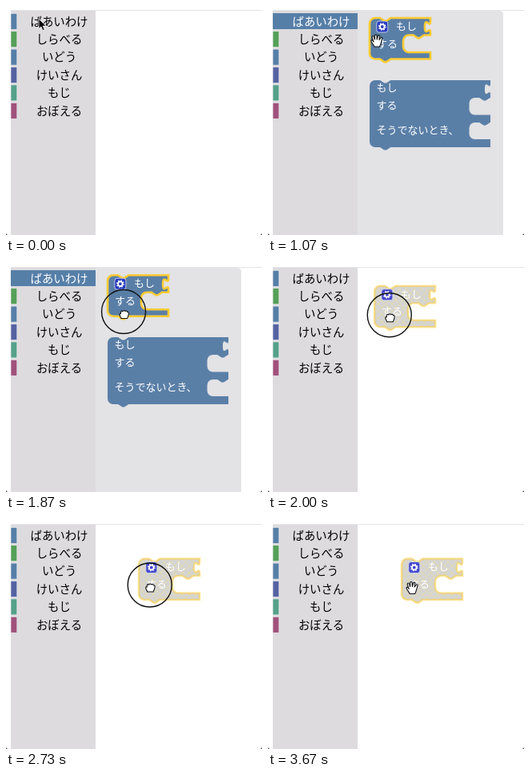
Recreate the animation shown at these times as an HTML page. Size 320x287 px, loop 3.74 s.

```html
<!DOCTYPE html>
<html lang="ja">
<head>
<meta charset="utf-8">
<style>
html, body { margin: 0; width: 100%; height: 100%; overflow: hidden; background: #fff; }
svg { display: block; width: 100vw; height: 100vh; }
text { font-family: "Noto Sans CJK JP", "Noto Sans CJK", sans-serif; }
#menu text { font-size: 14.4px; text-anchor: middle; }
.block text { font-size: 13px; font-weight: 500; fill: #fff; }
.shape { fill: #5a7fa7; }
.selected .shape { stroke: #fc3; stroke-width: 2.6; }
.dragged .shape { fill: url(#hatch); fill-opacity: .5; stroke-opacity: .5; }
.icon { fill: #2a3cc0; stroke: #dde2f0; stroke-width: .8; }
.dragged .icon { fill: #4448cc; }
.gear { fill: none; stroke: #fff; }
.hand { fill: #fff; stroke: #111; stroke-width: 1.1; stroke-linejoin: round; }
</style>
</head>
<body>
<svg viewBox="0 0 320 287">
  <defs>
    <pattern id="hatch" width="9" height="9" patternUnits="userSpaceOnUse">
      <path d="M0 0h9v9h-9z" fill="#aaa"/>
      <path d="M0 0L9 9M9 0L0 9" stroke="#c8b450"/>
    </pattern>
  </defs>
  <path d="M6 5.5H320" stroke="#e3e3e8"/>
  <path d="M0 287v-3q0 3 3 3zM320 287v-3q0 3 -3 3z" fill="#333"/>
  <path d="M6 6H112V287H6z" fill="#dddbde"/>
  <g id="menu"></g>
  <g id="flyout">
    <path d="M112 6H289q5 0 5 5V287H112z" fill="#e3e2e5"/>
    <g class="block" transform="translate(127 93)">
      <path class="shape" id="ifElse"/>
      <text x="8.5" y="13.8">もし</text>
      <text x="8.5" y="35.8">する</text>
      <text x="8.5" y="67">そうでないとき、</text>
    </g>
  </g>
  <g id="drag" class="block">
    <path class="shape" id="ifOnly"/>
    <rect class="icon" x="8.8" y="4" width="14" height="14" rx="3"/>
    <circle class="gear" cx="15.8" cy="11" r="2.8" stroke-width="1.8"/>
    <circle class="gear" cx="15.8" cy="11" r="4.2" stroke-width="1.3" stroke-dasharray="1.65 1.65"/>
    <text x="33" y="14.8">もし</text>
    <text x="9" y="36.5">する</text>
  </g>
  <g id="pointer">
    <circle id="ring" r="27.5" fill="none" stroke="#111" stroke-width="1.4"/>
    <path id="arrow" d="M0 0V12.5L2.9 9.9L5 14.6L7.2 13.6L5.2 9.1H9.2z" fill="#000" stroke="#fff" stroke-width=".8"/>
    <path id="open" class="hand" transform="translate(.5 4)" d="M-3 7C-4 4 -8 1 -7 -1C-6 -2 -5 -1 -4 1L-6 -5C-6 -7 -4 -7 -3.5 -5L-2.5 -2V-7C-2.3 -8.5 -.3 -8.5 0 -7L.2 -2L1.5 -6.5C2 -8 4 -7.5 3.6 -6L3 -1.5L5 -4C6 -5.5 7.5 -4.5 6.8 -3C5.5 1 5 4 3.5 7z"/>
    <path id="fist" class="hand" transform="translate(.5 3.5)" d="M-3.5 5C-4 3 -6 1 -5.5 -.5C-5 -1.5 -4 -1 -4 -1V-3C-3.5 -5 -2 -4.5 -1.5 -3.8C-1 -5.5 1 -5.3 1.3 -4C2 -5 3.8 -4.6 4 -3.2C5.5 -3.6 6 -2.5 5.8 -1C5.8 2 4.5 3 4 5z"/>
  </g>
</svg>
<script>
const LOOP = 3740;
const $ = id => document.getElementById(id);
const show = (id, on) => $(id).style.display = on ? '' : 'none';
const place = (id, [x, y]) => $(id).setAttribute('transform', `translate(${x} ${y})`);

const rows = [['ばあいわけ', '#567fa8'], ['しらべる', '#55a058'], ['いどう', '#567fa8'],
  ['けいさん', '#5562a2'], ['もじ', '#55a18a'], ['おぼえる', '#a0527c']];
$('menu').innerHTML = rows.map(([label, color], i) => {
  const y = 9 + i * 22.4;
  return `<rect x="6" y="${y + .3}" width="7.8" height="20" fill="${color}" stroke="#e9e8ea" stroke-width=".7"/>
    <rect ${i ? '' : 'id="rowBack"'} x="6" y="${y}" width="106" height="20" fill="none"/>
    <text ${i ? '' : 'id="rowText"'} x="66.5" y="${y + 15.6}">${label}</text>`;
}).join('');

// Block outline: width, inner wall of the mouths, [top, bottom] of each mouth, full height
function outline(width, wall, mouths, height) {
  const cuts = mouths.map(([top, bottom]) =>
    `V${top}H${wall + 26}l-5.3 3.6h-2.7l-5.3 -3.6H${wall + 7}a7 7 0 0 0 -7 7V${bottom - 7}a7 7 0 0 0 7 7H${width}`);
  return `M0 7a7 7 0 0 1 7 -7H13l5.3 3.6h2.7l5.3 -3.6H${width}v4.5c0 9 -7 -7 -7 6.7s7 -2.2 7 6.7` +
    cuts.join('') + `V${height}H26.3l-5.3 3.6h-2.7l-5.3 -3.6H7a7 7 0 0 1 -7 -7z`;
}
$('ifOnly').setAttribute('d', outline(76, 42, [[21.5, 43]], 51.5));
$('ifElse').setAttribute('d', outline(151, 124.5, [[22, 43.5], [53, 74]], 84));

const pointerPath = [[70, 41, 16], [530, 65, 16], [820, 65, 16], [1050, 135.5, 40], [1100, 135.5, 40],
  [1330, 147, 61], [1870, 147, 61], [1930, 149, 63], [2330, 164.6, 76], [2470, 173.6, 79], [2730, 179.7, 81.5]];
const blockPath = [[1870, 127, 15], [1930, 130, 26], [2330, 147.3, 41.5], [2470, 157, 45],
  [2730, 166, 48.5], [2950, 167, 48.5]];

function along(path, t) {
  const i = path.findIndex(p => p[0] > t);
  if (i < 0) return path[path.length - 1].slice(1);
  if (!i) return path[0].slice(1);
  const [t0, x0, y0] = path[i - 1], [t1, x1, y1] = path[i];
  const k = (t - t0) / (t1 - t0);
  return [x0 + (x1 - x0) * k, y0 + (y1 - y0) * k];
}
const ramp = (t, from, to) => Math.min(1, Math.max(0, (t - from) / (to - from)));

function draw(t) {
  const flyout = t >= 800 && t < 1930, dragged = t >= 1930;
  const held = t >= 1470 && t < 3130;
  const hover = t >= 600 && t < 800;
  $('rowBack').setAttribute('fill', flyout ? '#567fa8' : hover ? '#e5e3e6' : 'none');
  $('rowBack').setAttribute('x', hover ? 14 : 6);
  $('rowBack').setAttribute('width', hover ? 98 : 106);
  $('rowText').setAttribute('fill', flyout ? '#fff' : '#000');
  show('flyout', flyout);
  show('drag', flyout || dragged);
  $('drag').setAttribute('class', 'block' + (t >= 1000 ? ' selected' : '') + (dragged ? ' dragged' : ''));
  place('drag', along(blockPath, t));
  place('pointer', along(pointerPath, t));
  show('arrow', t < 1000);
  show('open', t >= 1000 && !held);
  show('fist', held);
  $('ring').setAttribute('opacity', ramp(t, 1440, 1570) - ramp(t, 3040, 3200));
}

const start = performance.now();
function tick() {
  draw((performance.now() - start) % LOOP);
  requestAnimationFrame(tick);
}
tick();
</script>
</body>
</html>
```
